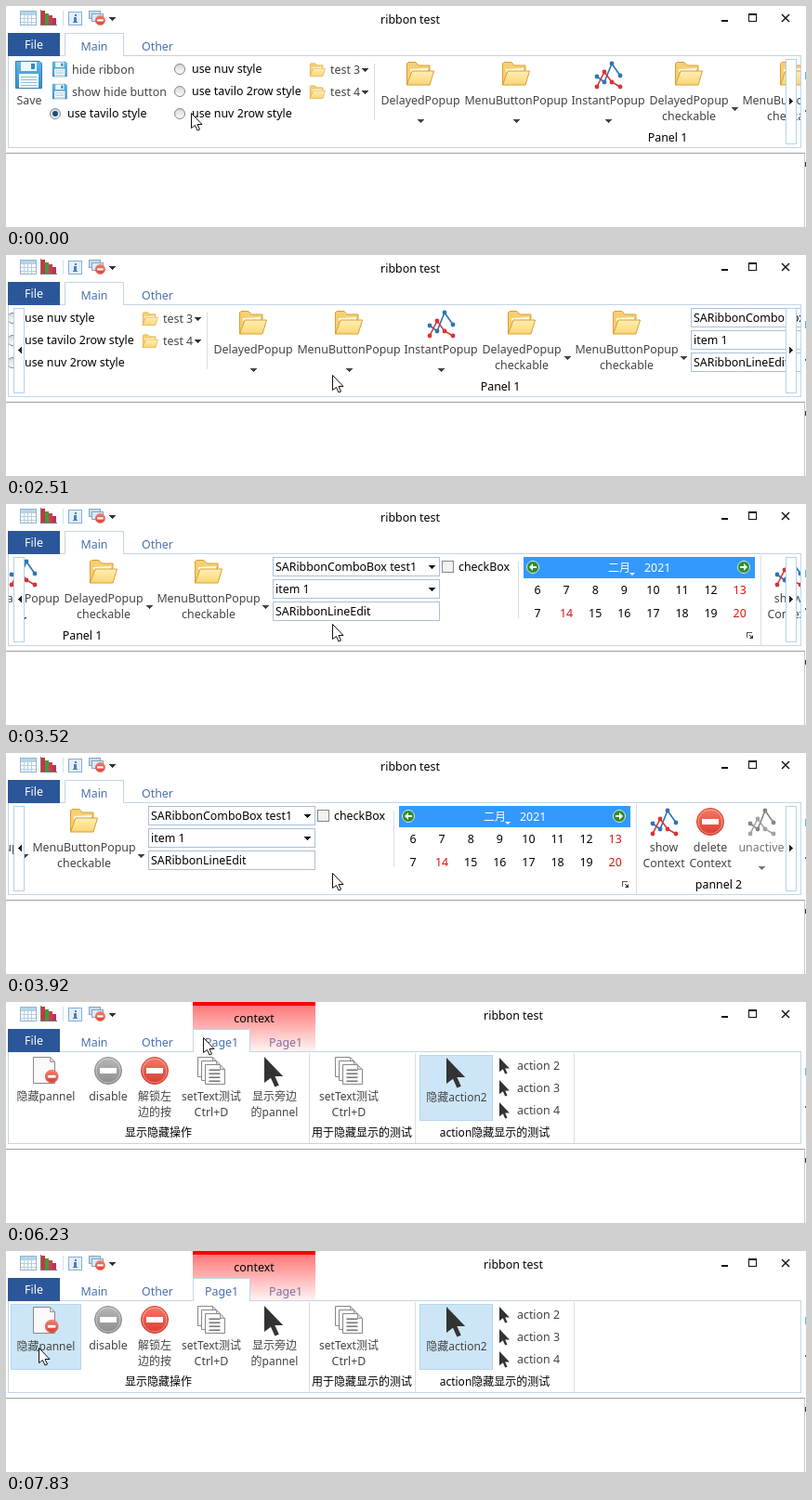
Recreate the animation shown at these times as an HTML page with a canvas. Size 861x238 px, loop 8 s.

```html
<!DOCTYPE html>
<html lang="en">
<head>
<meta charset="utf-8">
<title>Ribbon test</title>
<style>
  html, body { margin: 0; width: 100%; height: 100%; overflow: hidden; background: #fff; }
  canvas { display: block; }
</style>
</head>
<body>
<canvas id="stage" width="861" height="238"></canvas>
<script>
const ctx = document.getElementById('stage').getContext('2d');
const LOOP = 8000;
const FAMILY = '"Noto Sans", "Noto Sans CJK SC", "Noto Sans CJK", sans-serif';
const INK = '#444', BLUE = '#4a70ad', EDGE = '#c3d5e8', HOVER = '#cde6f7', PRESS = '#92c0e0';

// [time, scroll offset]
const SCROLL = [[0, 0], [2510, 180], [3060, 360], [3370, 540], [3520, 630], [3770, 720], [3920, 764]];
// [time, x, y]
const POINTER = [
  [0, 199, 115], [150, 222, 116], [710, 220, 118], [860, 218, 119],
  [1140, 226, 102], [1300, 262, 96], [1460, 310, 108], [1620, 345, 128],
  [1780, 362, 150], [1960, 356, 142], [2110, 351, 129],
  [4070, 400, 136], [4320, 468, 135], [4470, 565, 124], [4620, 655, 108], [4770, 703, 95],
  [5050, 703, 91], [5350, 698, 88], [5500, 600, 72], [5650, 455, 54], [5800, 320, 40], [5960, 212, 38],
  [6690, 190, 55], [6840, 125, 80], [6980, 62, 100], [7120, 35, 104]
];
const latest = (steps, t) => steps.filter(step => step[0] <= t).pop();
const between = (t, from, to) => t >= from && t < to;

function rect(x, y, w, h, fill) {
  ctx.fillStyle = fill;
  ctx.fillRect(x, y, w, h);
}

function box(x, y, w, h, fill, edge) {
  rect(x, y, w, h, edge);
  rect(x + 1, y + 1, w - 2, h - 2, fill);
}

function fade(y0, y1, from, to) {
  const g = ctx.createLinearGradient(0, y0, 0, y1);
  g.addColorStop(0, from);
  g.addColorStop(1, to);
  return g;
}

function text(str, x, y, color = INK, align = 'left') {
  const size = /[\u4e00-\u9fff]/.test(str) ? 12 : 12.4;
  ctx.font = `${size}px ${FAMILY}`;
  ctx.fillStyle = color;
  ctx.textAlign = align;
  ctx.fillText(str, x, y + 4);
}
const centered = (str, x, y, color = INK) => text(str, x, y, color, 'center');

function poly(points, fill, stroke, width = 1, closed = true) {
  ctx.beginPath();
  points.forEach(([x, y]) => ctx.lineTo(x, y));
  if (closed) ctx.closePath();
  if (fill) { ctx.fillStyle = fill; ctx.fill(); }
  if (stroke) { ctx.strokeStyle = stroke; ctx.lineWidth = width; ctx.stroke(); }
}

function disc(x, y, r, fill, stroke, width = 1) {
  ctx.beginPath();
  ctx.arc(x, y, r, 0, Math.PI * 2);
  if (fill) { ctx.fillStyle = fill; ctx.fill(); }
  if (stroke) { ctx.strokeStyle = stroke; ctx.lineWidth = width; ctx.stroke(); }
}

function placed(x, y, scale, draw) {
  ctx.save();
  ctx.translate(x, y);
  ctx.scale(scale, scale);
  draw();
  ctx.restore();
}

function dropArrow(x, y, color = '#333') {
  for (let i = 0; i < 4; i++) rect(x - 3 + i, y - 2 + i, 7 - 2 * i, 1, color);
}

function sideArrow(x, y, dir) {
  for (let i = 0; i < 4; i++) rect(x + dir * (i - 2), y - 3 + i, 1, 7 - 2 * i, '#222');
}

// Icons use a box about 30 pixels wide.
function folder() {
  poly([[.5, 26], [.5, 3], [2, 1.5], [10, 1.5], [13, 5], [25, 5], [25, 10]], '#f6cf72', '#d79f35');
  poly([[4, 9], [23, 8], [23, 12], [4, 12]], '#fffbe8');
  poly([[.5, 26], [6, 11], [29.5, 11], [25, 26]], fade(11, 26, '#ffefb4', '#fbd675'), '#d79f35');
}

function floppy() {
  poly([[.5, .5], [26, .5], [28.5, 3], [28.5, 29.5], [.5, 29.5]], fade(0, 30, '#62b8e6', '#2f8fca'), '#2d7fb2');
  rect(6, 1, 17, 10, '#f1f8fb');
  rect(17, 3, 4, 6, '#3689bd');
  rect(4, 14, 21, 15, '#fbfdfe');
  for (let y = 17; y < 28; y += 3) rect(6, y, 17, 1, '#91b9cf');
}

function plot(blue = '#2f73b7', red = '#d63434') {
  const lines = [
    [blue, [[3, 17], [11, 23], [19, 3], [28, 16]]],
    [red, [[3, 28], [11, 12], [19, 23], [28, 28]]]
  ];
  for (const [color, points] of lines) {
    poly(points, null, color, 1.6, false);
    points.forEach(([x, y]) => disc(x, y, 2.4, color));
  }
}
const grayPlot = () => plot('#858585', '#a2a2a2');

function minus(light, dark) {
  disc(15, 15, 14.5, fade(0, 30, light, dark), dark);
  disc(15, 15, 13, null, 'rgba(255,255,255,.4)');
  rect(6, 12, 18, 6, '#fff');
}
const redMinus = () => minus('#f47b69', '#d83c2e');
const grayMinus = () => minus('#b9b9b9', '#8c8c8c');

function sheet(x, y, w, h) {
  poly([[x, y], [x + w - 5, y], [x + w, y + 5], [x + w, y + h], [x, y + h]], '#fafafa', '#888');
  poly([[x + w - 5, y], [x + w - 5, y + 5], [x + w, y + 5]], '#ddd', '#999');
}

function removePage() {
  sheet(1.5, .5, 23, 28);
  placed(14, 14, .48, redMinus);
}

function pages() {
  for (let i = 0; i < 3; i++) {
    const x = .5 + i * 4, y = .5 + i * 4;
    sheet(x, y, 21, 21);
    for (let k = 5; k < 19; k += 4) rect(x + 4, y + k, 12, 1.5, '#777');
  }
}

const ARROW = [[0, 0], [0, 16], [4, 13], [6.5, 18.5], [9, 17.5], [6.5, 12], [11.5, 12]];
const darkArrow = () => placed(4, 0, 1.75, () => poly(ARROW, '#333'));

function big(icon, cx, lines, options = {}) {
  const { dy = 0, color = INK, arrow } = options;
  placed(cx - 15, 59 + dy, 1, icon);
  lines.forEach((line, i) => centered(line, cx, 102 + dy + i * 17, color));
  if (arrow) dropArrow(...arrow, color);
}

function radio(x, y, label, checked) {
  disc(x, y, 5.5, fade(y - 6, y + 6, '#d4d4d4', '#fff'), '#858585');
  if (checked) disc(x, y, 3, '#174f7d');
  text(label, x + 13, y, '#000');
}

function combo(y, label, arrow) {
  box(917, y, 180, 21, '#fff', '#abc0d8');
  text(label, 920, y + 11, '#000');
  if (arrow) dropArrow(1088, y + 11, '#111');
}

const separator = (x, y, h) => rect(x, y, 1, h, '#d5dee8');

function calendar(x) {
  rect(x, 57, 249, 23, '#3399ff');
  for (const [cx, dir] of [[10, -1], [237, 1]]) {
    disc(x + cx, 68, 6.5, '#2f8b2f', '#d8efd0');
    poly([[x + cx + 4 * dir, 68], [x + cx, 64], [x + cx, 72]], '#fff');
    rect(x + cx - (dir > 0 ? 4 : 0), 67, 4, 2, '#fff');
  }
  text('二月', x + 91, 69, '#fff');
  text('2021', x + 130, 69, '#fff');
  poly([[x + 114, 74], [x + 120, 74], [x + 117, 77]], '#fff');
  for (let row = 0; row < 2; row++) {
    for (let col = 0; col < 8; col++) {
      const day = col ? 6 + row * 7 + col : 6 + row;
      const red = col === 7 || (row && col === 1);
      centered(day, x + 15 + col * 31.1, 93 + row * 25, red ? '#e01010' : '#000');
    }
  }
}

function mainPage(t) {
  const offset = latest(SCROLL, t)[1];
  const overShow = between(t, 4770, 5500);
  ctx.save();
  ctx.translate(-offset, 0);

  if (between(t, 2780, 3060)) {
    box(494, 57, 112, 71, '#e7f3fb', '#b5d6ee');
    rect(495, 92, 110, 35, HOVER);
  }
  if (overShow) box(1448, 57, 48, 72, between(t, 5050, 5190) ? PRESS : HOVER, '#b5d6ee');

  big(floppy, 25, ['Save']);
  for (const y of [60, 84]) placed(50, y, .54, floppy);
  text('hide ribbon', 71, 69);
  text('show hide button', 71, 93);
  radio(53, 116, 'use tavilo style', true);
  ['use nuv style', 'use tavilo 2row style', 'use nuv 2row style']
    .forEach((label, i) => radio(187, 68 + i * 24, label));
  for (let i = 0; i < 2; i++) {
    placed(327, 61 + i * 24, .56, folder);
    text('test ' + (3 + i), 349, 69 + i * 24);
    dropArrow(386, 69 + i * 24);
  }
  separator(396, 62, 61);
  big(folder, 446, ['DelayedPopup'], { arrow: [446, 124] });
  big(folder, 549, ['MenuButtonPopup'], { arrow: [549, 124] });
  big(plot, 648, ['InstantPopup'], { arrow: [648, 124] });
  big(folder, 735, ['DelayedPopup', 'checkable'], { arrow: [784, 111] });
  big(folder, 848, ['MenuButtonPopup', 'checkable'], { arrow: [909, 111] });
  centered('Panel 1', 712, 142, '#000');

  combo(57, 'SARibbonComboBox test1', true);
  combo(81, 'item 1', true);
  combo(105, 'SARibbonLineEdit', false);
  box(1099, 61, 13, 13, '#f2f2f2', '#858585');
  text('checkBox', 1117, 68, '#000');
  separator(1181, 62, 61);
  calendar(1187);
  rect(1427, 138, 6, 1, '#555');
  rect(1427, 138, 1, 6, '#555');
  poly([[1434, 141], [1434, 145], [1430, 145]], '#333');
  poly([[1430, 141], [1433, 144]], null, '#333', 1, false);
  separator(1442, 55, 97);

  big(plot, 1472, ['show', 'Context'], { dy: overShow ? 1 : 0 });
  big(redMinus, 1522, ['delete', 'Context']);
  big(grayPlot, 1577, ['unactive'], { color: '#777', arrow: [1577, 124] });
  centered('pannel 2', 1531, 142, '#000');
  ctx.restore();

  const scrollButtons = offset ? [[8, -1], [839, 1]] : [[839, 1]];
  for (const [x, dir] of scrollButtons) {
    box(x, 57, 12, 92, '#fff', '#b4d2ec');
    sideArrow(x + 6, 102, dir);
  }
}

function contextPage(t) {
  const hover = t >= 7120;
  if (hover) box(5, 57, 76, 71, between(t, 7680, 7830) ? PRESS : HOVER, '#b5d6ee');
  box(445, 57, 79, 71, HOVER, '#b5d6ee');

  big(removePage, 43, ['隐藏pannel'], { dy: hover ? 1 : 0 });
  big(grayMinus, 110, ['disable']);
  big(redMinus, 160, ['解锁左', '边的按']);
  big(pages, 221, ['setText测试', 'Ctrl+D']);
  big(darkArrow, 289, ['显示旁边', '的pannel']);
  centered('显示隐藏操作', 164, 141, '#000');
  separator(326, 55, 97);
  big(pages, 369, ['setText测试', 'Ctrl+D']);
  centered('用于隐藏显示的测试', 383, 141, '#000');
  separator(440, 55, 97);
  big(darkArrow, 485, ['隐藏action2'], { dy: 1 });
  for (let i = 0; i < 3; i++) {
    placed(531, 60 + i * 24, .95, () => poly(ARROW, '#333'));
    text('action ' + (2 + i), 550, 69 + i * 24);
  }
  centered('action隐藏显示的测试', 526, 141, '#000');
  separator(611, 55, 97);
}

function quickAccess() {
  box(15, 5, 18, 16, '#fff', '#8fb6cf');
  rect(16, 6, 16, 3, '#b5d6ea');
  for (let i = 0; i < 3; i++) {
    rect(19 + i * 4, 6, 1, 14, '#b5cfdf');
    rect(16, 9 + i * 4, 16, 1, '#b5cfdf');
  }
  rect(37, 4, 1, 17, '#777');
  rect(37, 20, 18, 1, '#777');
  [['#c93737', 15], ['#3c9a4c', 12], ['#cf3d46', 10], ['#b63262', 7]]
    .forEach(([color, h], i) => rect(38 + i * 4, 20 - h, 4, h, color));
  separator(61, 5, 16);
  box(67, 6, 15, 15, '#e3effa', '#86afd5');
  rect(74, 9, 2, 2, '#4a7fb5');
  rect(73, 12, 3, 6, '#4a7fb5');
  rect(72, 17, 5, 1, '#4a7fb5');
  box(89, 5, 13, 9, '#c4dcec', '#82a8c5');
  box(92, 8, 13, 9, '#dcebf5', '#82a8c5');
  placed(96, 10, .36, redMinus);
  dropArrow(114, 14);
}

function windowButtons() {
  rect(770, 15, 7, 2, '#111');
  box(799, 8, 9, 9, '#fff', '#111');
  rect(799, 8, 9, 2, '#111');
  poly([[835, 9], [843, 17]], null, '#111', 1.5, false);
  poly([[843, 9], [835, 17]], null, '#111', 1.5, false);
}

function selectedTab(x, w) {
  rect(x, 29, w, 25, EDGE);
  rect(x + 1, 30, w - 2, 24, '#fff');
}

function frame(t) {
  const hasContext = t >= 5190, onContext = t >= 6110;
  rect(0, 0, 861, 238, '#fff');

  quickAccess();
  windowButtons();
  centered('ribbon test', hasContext ? 546 : 435, 15, '#000');

  box(2, 53, 854, 100, '#fff', EDGE);
  if (hasContext) {
    rect(201, 4, 132, 49, fade(4, 53, '#ff7878', '#fff4f4'));
    rect(201, 0, 132, 4, '#f00');
    centered('context', 267, 18, '#000');
  }
  rect(2, 29, 56, 25, '#2b579a');
  centered('File', 30, 42, '#fff');
  if (onContext) selectedTab(201, 62); else selectedTab(63, 64);
  centered('Main', 95, 44, BLUE);
  centered('Other', 163, 44, BLUE);
  if (hasContext) {
    centered('Page1', 232, 44, onContext ? BLUE : '#80709f');
    centered('Page1', 301, 44, '#80709f');
  }

  ctx.save();
  ctx.beginPath();
  ctx.rect(3, 54, 852, 98);
  ctx.clip();
  if (onContext) contextPage(t); else mainPage(t);
  ctx.restore();

  rect(0, 158, 860, 1, '#a0a0a0');
  rect(859, 159, 1, 79, '#c8c8c8');
  rect(860, 71, 1, 8, '#55bcd0');
  rect(860, 112, 1, 2, '#555');
  rect(860, 168, 1, 5, '#333');

  const [, x, y] = latest(POINTER, t);
  placed(x + .5, y + .5, 1, () => poly(ARROW, '#fff', '#111'));
}

function tick() {
  frame(performance.now() % LOOP);
  requestAnimationFrame(tick);
}
tick();
</script>
</body>
</html>
```
